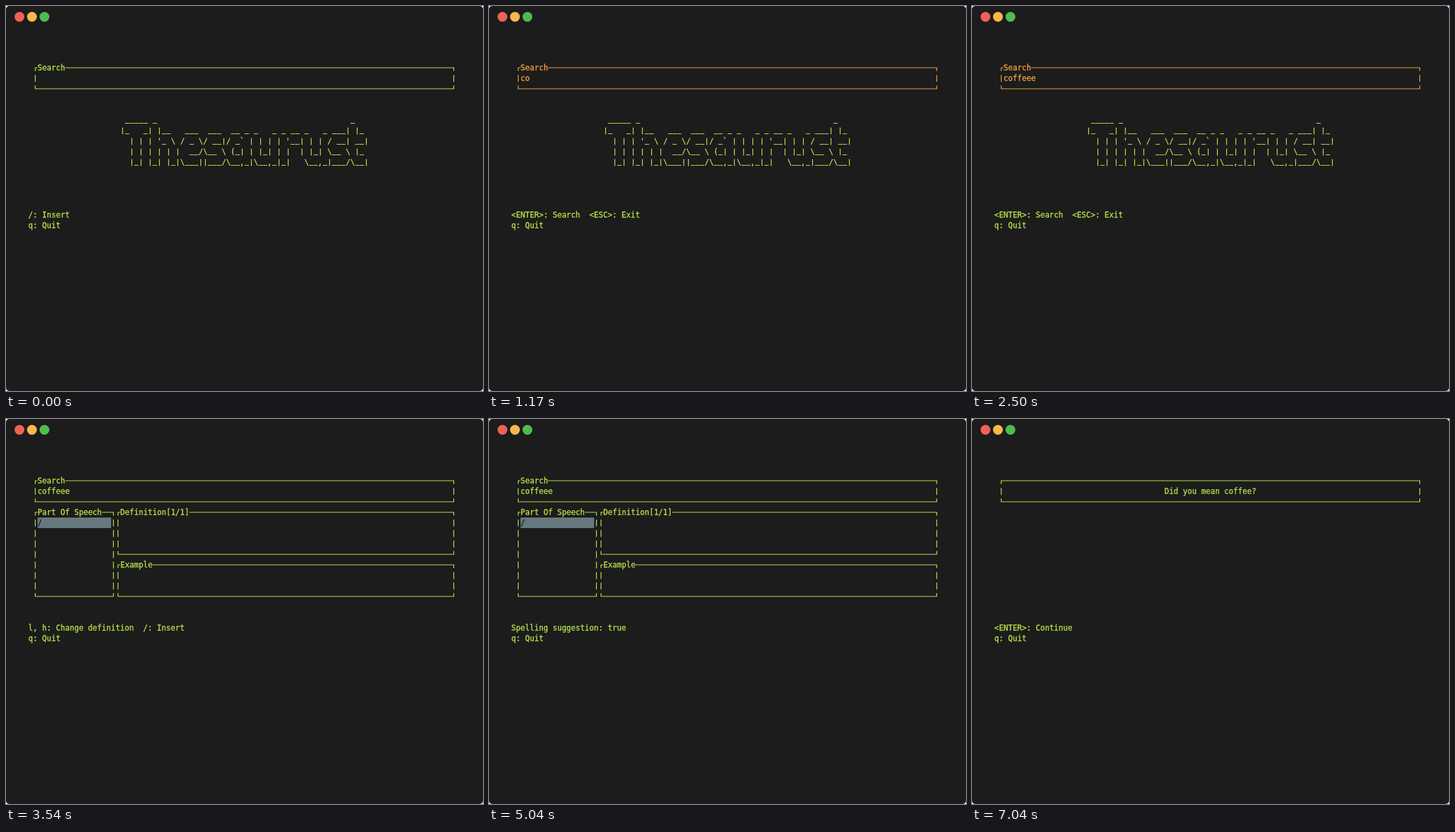
These frames come from a looping animation (726x586 px, 8 s). An HTML page:

```html
<!DOCTYPE html>
<html lang="en">
<head>
<meta charset="utf-8">
<title>Thesaurust</title>
<style>
  html, body { margin: 0; width: 100%; height: 100%; overflow: hidden; background: #fff; }
  svg { display: block; }
  text { font: 11.627px "DejaVu Sans Mono", "Noto Sans Mono", monospace; white-space: pre; stroke-width: .3; }
</style>
</head>
<body>
<svg width="726" height="586" viewBox="0 0 726 586">
  <rect width="726" height="586" rx="5" fill="#1c1c1c"/>
  <circle cx="20.5" cy="16.5" r="7.5" fill="#ed6255"/>
  <circle cx="39.5" cy="16.5" r="7.5" fill="#f6b84c"/>
  <circle cx="58.5" cy="16.5" r="7.5" fill="#4ebd50"/>
  <g id="screen"></g>
</svg>
<script>
const LOOP = 8000, CELL_W = 7, CELL_H = 16, LEFT = 34, TOP = 94;
const GREEN = '#b9e44b', ORANGE = '#f2a33c', GREY = '#65797f', DARK = '#1c1c1c';

const LOGO = [
  ' _____ _' + ' '.repeat(42) + '_',
  '|_   _| |__   ___  ___  __ _ _   _ _ __ _   _ ___| |_',
  "  | | | '_ \\ / _ \\/ __|/ _` | | | | '__| | | / __| __|",
  '  | | | | | |  __/\\__ \\ (_| | |_| | |  | |_| \\__ \\ |_',
  '  |_| |_| |_|\\___||___/\\__,_|\\__,_|_|   \\__,_|___/\\__|'
];

// Logo characters drawn as strokes, relative to the middle left of a cell
const STROKES = {
  '_': 'm.2 4.5h6.6',
  '|': 'm3.5-5v10.5',
  '/': 'm5.8-5l-4.6 10',
  '\\': 'm1.2-5l4.6 10'
};

const HELP = {
  home: '/: Insert',
  insert: '<ENTER>: Search  <ESC>: Exit',
  browse: 'l, h: Change definition  /: Insert',
  spelling: 'Spelling suggestion: true',
  confirm: '<ENTER>: Continue'
};

// start time, view, help line, search word
const STEPS = [
  [0, 'home', 'home', ''],
  [670, 'home', 'insert', ''],
  [940, 'home', 'insert', 'c'],
  [1170, 'home', 'insert', 'co'],
  [1640, 'home', 'insert', 'cof'],
  [1810, 'home', 'insert', 'coff'],
  [2030, 'home', 'insert', 'coffe'],
  [2210, 'home', 'insert', 'coffee'],
  [2500, 'home', 'insert', 'coffeee'],
  [3540, 'result', 'browse', 'coffeee'],
  [4330, 'result', 'spelling', 'coffeee'],
  [5660, 'result', 'insert', 'coffeee'],
  [7040, 'confirm', 'confirm', '']
];

const screen = document.getElementById('screen');
const colX = c => LEFT + c * CELL_W;
const rowY = r => TOP + r * CELL_H;

function add(tag, attrs) {
  const el = document.createElementNS('http://www.w3.org/2000/svg', tag);
  for (const k in attrs) el.setAttribute(k, attrs[k]);
  return screen.appendChild(el);
}

function write(col, row, str, fill = GREEN) {
  add('text', { x: colX(col), y: rowY(row) + 4, fill, stroke: fill }).textContent = str;
}

function trace(d, stroke = GREEN) {
  add('path', { d, stroke, fill: 'none', 'stroke-width': 1.2 });
}

// Frame made of terminal cells: corners plus one short bar per row
function box(c1, c2, r1, r2, title = '', stroke = GREEN) {
  const x1 = colX(c1) + 3.5, x2 = colX(c2) + 3.5;
  const y1 = rowY(r1), y2 = rowY(r2), resume = colX(c1 + 1 + title.length);
  let d = `M${x1} ${y1 + 5}V${y1}H${colX(c1 + 1)}M${resume} ${y1}H${x2}V${y1 + 5}` +
          `M${x1} ${y2 - 5}V${y2}H${x2}V${y2 - 5}`;
  for (let r = r1 + 1; r < r2; r++)
    for (const x of [x1, x2]) d += `M${x} ${rowY(r) - 5}v10.5`;
  trace(d, stroke);
  write(c1 + 1, r1, title, stroke);
}

function logo(col, row) {
  let d = '';
  LOGO.forEach((line, r) => {
    [...line].forEach((ch, c) => {
      if (STROKES[ch]) d += `M${colX(col + c)} ${rowY(row + r)}${STROKES[ch]}`;
    });
    write(col, row + r, line.replace(/[_|\/\\]/g, ' '));
  });
  trace(d);
}

function draw([, view, help, word]) {
  screen.replaceChildren();
  if (view === 'confirm') {
    box(1, 92, 0, 2);
    write(37, 1, 'Did you mean coffee?');
  } else {
    const tint = help === 'insert' ? ORANGE : GREEN;
    box(1, 92, 0, 2, 'Search', tint);
    write(2, 1, word, tint);
  }
  if (view === 'home') logo(20, 5);
  if (view === 'result') {
    box(1, 18, 3, 11, 'Part Of Speech');
    box(19, 92, 3, 7, 'Definition[1/1]');
    box(19, 92, 8, 11, 'Example');
    add('rect', { x: colX(2), y: rowY(4) - 8, width: 16 * CELL_W, height: CELL_H, fill: GREY });
    write(2, 4, '/', DARK);
  }
  write(0, 14, HELP[help]);
  write(0, 15, 'q: Quit');
}

let shown = null;
function tick() {
  const t = performance.now() % LOOP;
  const step = STEPS.findLast(s => s[0] <= t);
  if (step !== shown) draw(shown = step);
  requestAnimationFrame(tick);
}
tick();
</script>
</body>
</html>
```
